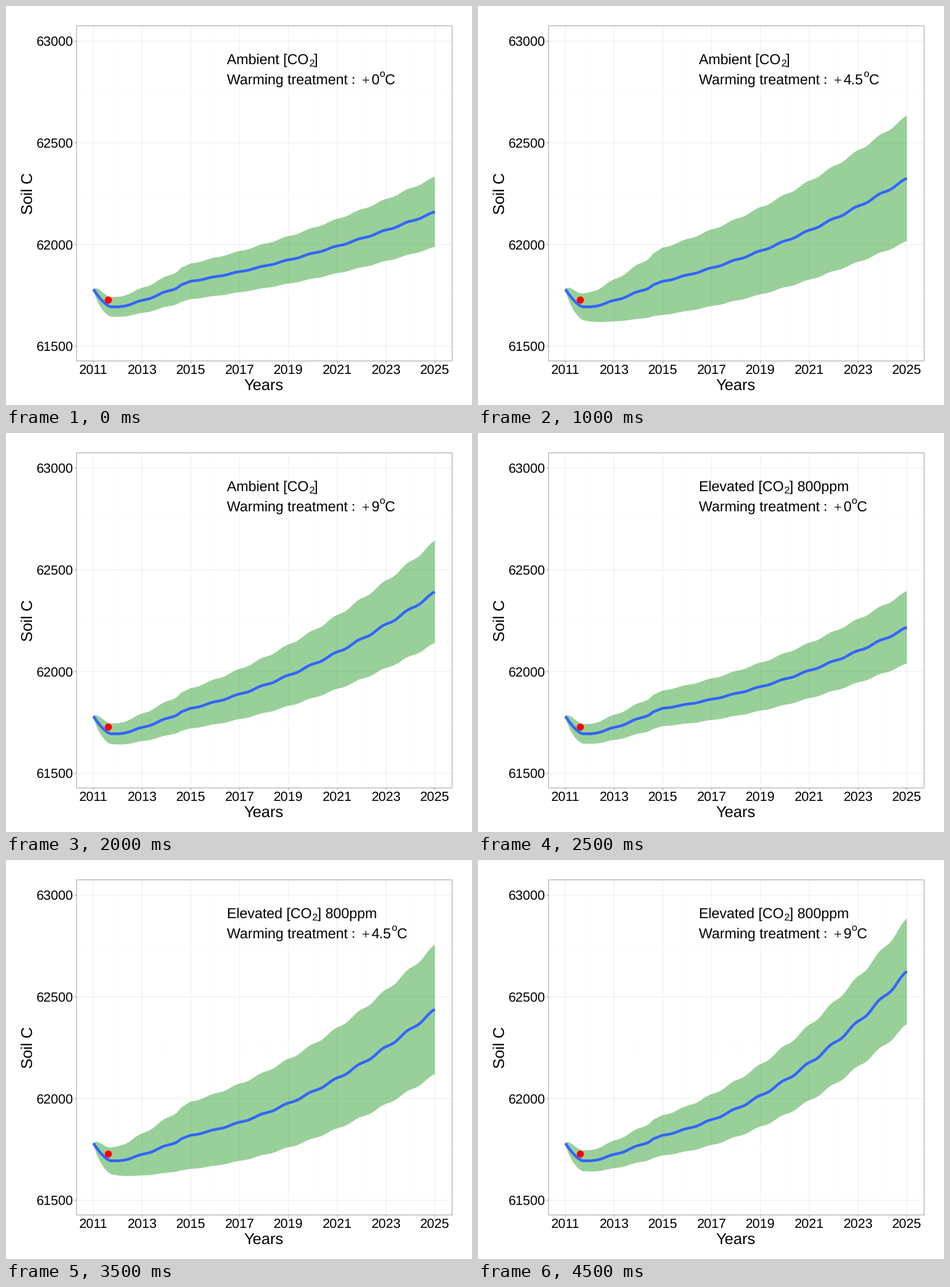
Recreate the animation shown at these times as a matplotlib script. Size 808 by 693 pixels, loop 5000 ms.

```python
import numpy as np
import matplotlib.pyplot as plt
from matplotlib.animation import FuncAnimation
from matplotlib.patches import Circle, Polygon, Rectangle

W, H, DPI = 808, 693, 100
PX = 72 / DPI
plt.rcParams.update({"text.hinting": "none", "font.family": "Liberation Sans"})

WARMING = [0, 2.25, 4.5, 6.75, 9]
# Band half-width in px at two key years, one value per warming level
HALF_2015 = [31, 29, 58.5, 31, 35]
HALF_2025 = [61, 70, 109, 74, 89]

t = np.linspace(0, 14, 561)


def year_x(year):
    return 151.5 + 42.29 * (year - 2011)


def carbon_y(value):
    return 591 - (value - 61500) * 0.35333


def season(t):
    """Time that runs fast in late summer and slow in winter."""
    a = 2 * np.pi
    return t + 0.065 * (np.sin(a * (t - .6)) - np.sin(-a * .6))


def curves(k, elevated):
    """Mean line and band half-width, in px, for one treatment."""
    warm = WARMING[k] / 9
    if elevated:
        gain = 140.5 + 168 * warm - 24 * warm ** 2
    else:
        gain = 120.5 + 81.5 * (1 - (1 - warm) ** 1.8)
    linear = .62 - .1 * warm - .17 * elevated

    s = np.maximum(season(t), 1)
    young = np.clip((s - 1) / 3, 0, 1)       # 2012 to 2015
    late = np.clip((s - 4) / 10, 0, 1)       # 2015 to 2025
    drop = 1 - (1 - np.clip(t / .72, 0, 1)) ** 1.5
    step = np.exp(-((t - 3.6) / .12) ** 2)

    mean = (492 + 30.5 * drop - 44.5 * young ** 1.25
            - gain * (linear * late + (1 - linear) * late ** 2) - 1.5 * step)

    mid, end = HALF_2015[k], HALF_2025[k] * (1 + .03 * elevated)
    start = 8 + .3 * mid
    half = (17 * (1 - .97 * np.exp(-6 * t)) + (start - 17) * np.minimum(t, 1)
            + (mid - start) * young
            + (end - mid) * (.75 * late + .25 * late ** 2) + .7 * step)
    return mean, half


fig = plt.figure(figsize=(W / DPI, H / DPI), dpi=DPI, facecolor="white")
ax = fig.add_axes([0, 0, 1, 1])
ax.set_xlim(0, W)
ax.set_ylim(H, 0)
ax.axis("off")


def line(x, y, color, width, z):
    return ax.plot(x, y, color=color, lw=width * PX, zorder=z, snap=False,
                   solid_capstyle="butt", solid_joinstyle="round")[0]


def text(x, y, s, size, ha="left", **kw):
    return ax.text(x, y, s, fontsize=size * PX, ha=ha, va="baseline",
                   color="black", zorder=8, **kw)


LEFT, RIGHT, TOP, BOTTOM = 122.3, 773.6, 34.5, 616.5
GREY, MAJOR, MINOR = "#999999", "#ebebeb", "#fafafa"

for year in range(2011, 2026):
    x = year_x(year)
    odd = year % 2
    line([x, x], [TOP, BOTTOM], MAJOR if odd else MINOR, 1, 1)
    if odd:
        line([x, x], [BOTTOM, BOTTOM + 4], GREY, 1, 2)
        text(x, 639, str(year), 23, "center")

for value in range(61500, 63001, 250):
    y = carbon_y(value)
    major = value % 500 == 0
    line([LEFT, RIGHT], [y, y], MAJOR if major else MINOR, 1, 1)
    if major:
        line([LEFT - 4, LEFT], [y, y], GREY, 1, 2)
        text(117.3, y + 8.2, str(value), 23, "right")

ax.add_patch(Rectangle((LEFT, TOP), RIGHT - LEFT, BOTTOM - TOP, fill=False,
                       ec=GREY, lw=PX, zorder=7, snap=False))
text(447, 667, "Years", 27.3, "center")
text(45.8, 325.5, "Soil C", 27.3, "center", rotation=90,
     rotation_mode="anchor")

SIZE, SMALL = 24.8, 17.3
NOTE_X, LINE1, LINE2 = 382.7, 100.8, 136
title = text(NOTE_X, LINE1, "", SIZE)
sub = text(0, LINE1 + 4.5, "2", SMALL)
tail = text(0, LINE1, "", SIZE)
text(NOTE_X, LINE2, "Warming treatment", SIZE)
text(598.2, LINE2, ":", SIZE, family="Liberation Serif")
text(617, LINE2, "+", SIZE, family="Liberation Serif")
degrees = text(633.5, LINE2, "", SIZE)
ring = text(0, LINE2 - 12.8, "o", SMALL)
unit = text(0, LINE2, "C", SIZE)

xs = year_x(2011 + t)
band = ax.add_patch(Polygon([[0, 0], [1, 1], [2, 0]], fc="#008b00", alpha=.4,
                            lw=0, zorder=3))
trend = line([], [], "#3366ff", 4.8, 4)
ax.add_patch(Circle((177.5, 510.7), 6.2, fc="red", lw=0, zorder=5))


def update(n):
    elevated, k = divmod(n, 5)
    mean, half = curves(k, elevated)
    trend.set_data(xs, mean)
    band.set_xy(np.column_stack([np.r_[xs, xs[::-1]],
                                 np.r_[mean - half, (mean + half)[::-1]]]))

    title.set_text("Elevated [CO" if elevated else "Ambient [CO")
    tail.set_text("] 800ppm" if elevated else "]")
    x = NOTE_X + SIZE * (5.947 if elevated else 5.724)
    sub.set_x(x)
    tail.set_x(x + .556 * SMALL)

    label = f"{WARMING[k]:g}"
    degrees.set_text(label)
    x = 633.5 + SIZE * sum(.278 if c == "." else .556 for c in label)
    ring.set_x(x)
    unit.set_x(x + .556 * SMALL)
    return band, trend, title, sub, tail, degrees, ring, unit


anim = FuncAnimation(fig, update, frames=10, interval=500, repeat=True,
                     repeat_delay=0, blit=False)
plt.show()
```
